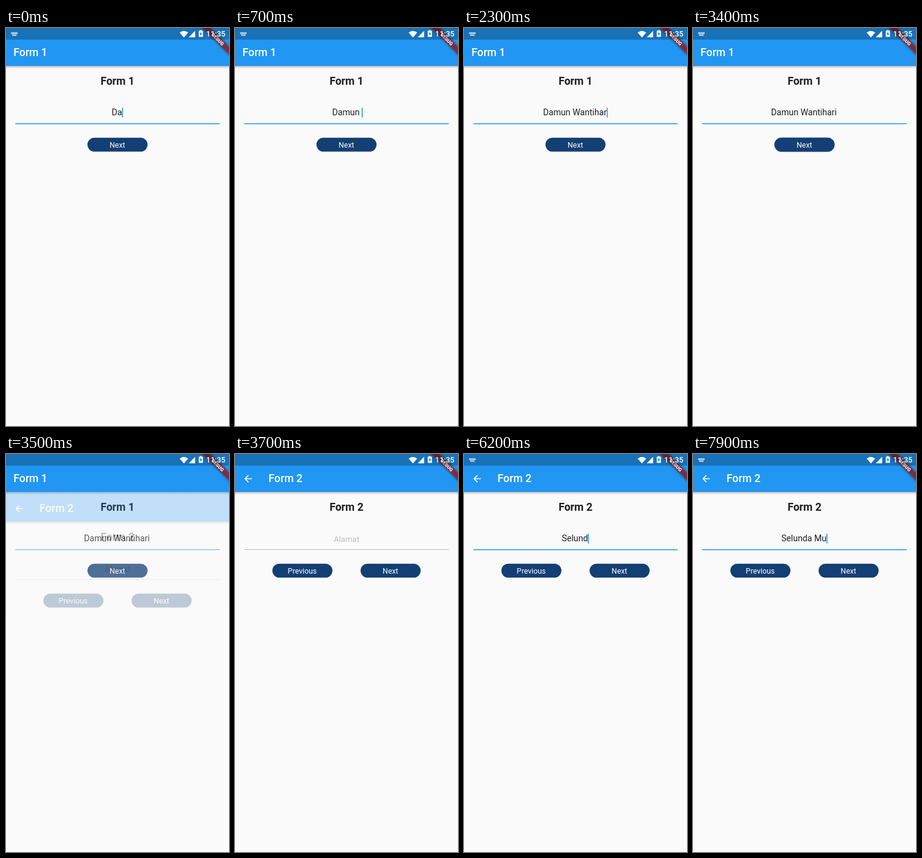
An HTML page that plays this animation: 366 by 652 pixels, repeating every 8000 ms.

```html
<!DOCTYPE html>
<html lang="id">
<head>
<meta charset="utf-8">
<title>Form steps</title>
<style>
  html, body { margin: 0; width: 100%; height: 100%; overflow: hidden; background: #fafafa; }
  svg { display: block; width: 366px; height: 652px; font-family: Roboto, sans-serif; }
  text { white-space: pre; }
  .title { font-size: 17.67px; font-weight: 500; fill: #fff; }
  .head { font-size: 17.67px; font-weight: 700; fill: #212121; text-anchor: middle; }
  .typed { font-size: 14.13px; fill: #212121; text-anchor: middle; }
  .hint { font-size: 13.2px; fill: #bdbdbd; text-anchor: middle; }
  .label { font-size: 12.36px; fill: #fff; text-anchor: middle; }
  .clock { font-size: 12.4px; font-weight: 500; fill: #fff; }
  .debug { font-size: 7.8px; font-weight: 900; fill: #fff; text-anchor: middle; }
</style>
</head>
<body>
<svg viewBox="0 0 366 652">
  <defs>
    <linearGradient id="shade" x2="0" y2="1">
      <stop offset="0" stop-opacity=".32"/>
      <stop offset=".4" stop-opacity=".12"/>
      <stop offset="1" stop-opacity="0"/>
    </linearGradient>
    <filter id="soft" x="-20%" y="-80%" width="140%" height="260%">
      <feGaussianBlur stdDeviation="2.2"/>
    </filter>
    <g id="base">
      <rect width="366" height="652" fill="#fafafa"/>
      <rect y="62" width="366" height="5" fill="url(#shade)"/>
      <rect width="366" height="62" fill="#2196f3"/>
      <rect x="15.3" y="156" width="335.4" height="1" fill="#b9b9b9"/>
    </g>
    <rect id="pill" x="-49.3" y="179.7" width="98.6" height="22.8" rx="11.4" fill="#133f74"/>
    <rect id="line" x="15.3" y="156" width="335.4" height="1.5" fill="#2196f3"/>
    <rect id="caret" y="130.5" width="1.5" height="16.2" fill="#2196f3"/>
  </defs>

  <g id="page1">
    <use href="#base"/>
    <text class="title" x="12.3" y="46.2">Form 1</text>
    <text class="head" x="183" y="93.2">Form 1</text>
    <use class="focus" href="#line"/>
    <text class="typed" x="182" y="142.9"></text>
    <use class="cursor" href="#caret"/>
    <use id="press" href="#pill" x="183" stroke="#000" stroke-opacity=".05" stroke-width="3"/>
    <use href="#pill" x="183"/>
    <text class="label" x="182.8" y="195.5">Next</text>
  </g>

  <g id="page2">
    <use href="#base"/>
    <path transform="translate(12.3 31.3) scale(.768)" fill="#fff"
      d="M20 11H7.83l5.59-5.59L12 4l-8 8 8 8 1.41-1.41L7.83 13H20z"/>
    <text class="title" x="55.1" y="46.2">Form 2</text>
    <text class="head" x="183" y="93.2">Form 2</text>
    <use class="focus" href="#line"/>
    <text class="hint" x="183" y="143.5">Alamat</text>
    <text class="typed" x="182" y="142.9"></text>
    <use class="cursor" href="#caret"/>
    <use href="#pill" x="110.6"/>
    <text class="label" x="110.4" y="195.5">Previous</text>
    <use href="#pill" x="255.4"/>
    <text class="label" x="255.1" y="195.5">Next</text>
  </g>

  <g transform="translate(366 0) rotate(45)">
    <rect x="-46" y="21.5" width="92" height="9.2" fill-opacity=".5" filter="url(#soft)"/>
    <rect x="-46" y="21.5" width="92" height="9.2" fill="#b71c1c" fill-opacity=".63"/>
    <text class="debug" y="28.9">DEBUG</text>
  </g>

  <rect width="366" height="19" fill-opacity=".25"/>
  <g fill="#fff">
    <path d="M285 7.6Q292 1.8 299 7.6L292 15.4Z"/>
    <path d="M300 15.2H310.4V4.6Z"/>
    <path d="M318.4 3.4h2.8v1.2h2V14.4h-6.8V4.6h2z"/>
    <path d="M320.4 6L317.8 10h1.6v3l2.6-4h-1.6z" fill="#1971b6"/>
    <g id="keys" opacity=".75">
      <path d="M8.4 7h10.6v3H8.4zM10 10.8h7.4v2H10z"/>
      <path d="M9.4 8.5h8.8" stroke="#1971b6" stroke-width=".8" stroke-dasharray="1 1"/>
    </g>
    <text class="clock" x="328.6" y="14.4">11:35</text>
  </g>
</svg>
<script>
const LOOP = 8000, TICK = 100, BLINK = 500;
const $ = id => document.getElementById(id);
const clamp = v => Math.min(1, Math.max(0, v));
const show = (el, on) => el.setAttribute('visibility', on ? 'inherit' : 'hidden');

// Cubic Bezier easing, solved by bisection
function bezier(x1, y1, x2, y2) {
  const at = (a, b, s) => 3 * a * s * (1 - s) ** 2 + 3 * b * s * s * (1 - s) + s ** 3;
  return x => {
    if (x <= 0 || x >= 1) return clamp(x);
    let lo = 0, hi = 1;
    for (let i = 0; i < 24; i++) {
      const mid = (lo + hi) / 2;
      if (at(x1, x2, mid) < x) lo = mid; else hi = mid;
    }
    return at(y1, y2, lo);
  };
}
const easeIn = bezier(.42, 0, 1, 1);
const fastOutSlowIn = bezier(.4, 0, .2, 1);

function makeField(page, value, keys, focusAt, blurAt) {
  const text = page.querySelector('.typed');
  const cursor = page.querySelector('.cursor');
  const focus = page.querySelector('.focus');
  const hint = page.querySelector('.hint');
  return t => {
    const count = keys.filter(k => k <= t).length;
    const typed = value.slice(0, count), word = typed.trimEnd();
    text.textContent = word;
    const width = word ? text.getComputedTextLength() : 0;
    // A trailing space moves the caret but not the centred word
    const gap = (typed.length - word.length) * 3.5;
    cursor.setAttribute('x', 182 + width / 2 + gap);
    const since = t - (count ? keys[count - 1] : focusAt);
    show(cursor, since >= 0 && t < blurAt && Math.floor(since / BLINK) % 2 === 0);
    focus.setAttribute('opacity', clamp((t - focusAt + 200) / 200) * clamp((blurAt + 300 - t) / 200));
    if (hint) show(hint, !count);
  };
}

const fields = [
  makeField($('page1'), 'Damun Wantihari',
    [0, 0, 200, 300, 400, 700, 900, 1100, 1400, 1500, 1900, 2100, 2200, 2300, 2400], 0, 3300),
  makeField($('page2'), 'Selunda Mu',
    [5300, 5400, 5500, 5600, 5800, 6200, 6500, 7200, 7800, 7900], 4500, LOOP + 500)
];

function draw(t) {
  fields.forEach(f => f(t));
  const p = clamp((t - 3366) / 300), alpha = easeIn(p);
  $('page2').setAttribute('opacity', alpha < .05 ? 0 : alpha);
  $('page2').setAttribute('transform', `translate(0 ${163 * (1 - fastOutSlowIn(p))})`);
  show($('press'), t >= 3300 && t < 3500);
  show($('keys'), t < 3500 || t >= 4600);
}

const start = performance.now();
let last = -1;
function frame() {
  const t = Math.floor((performance.now() - start) % LOOP / TICK) * TICK;
  if (t !== last) draw(last = t);
  requestAnimationFrame(frame);
}
frame();
</script>
</body>
</html>
```
